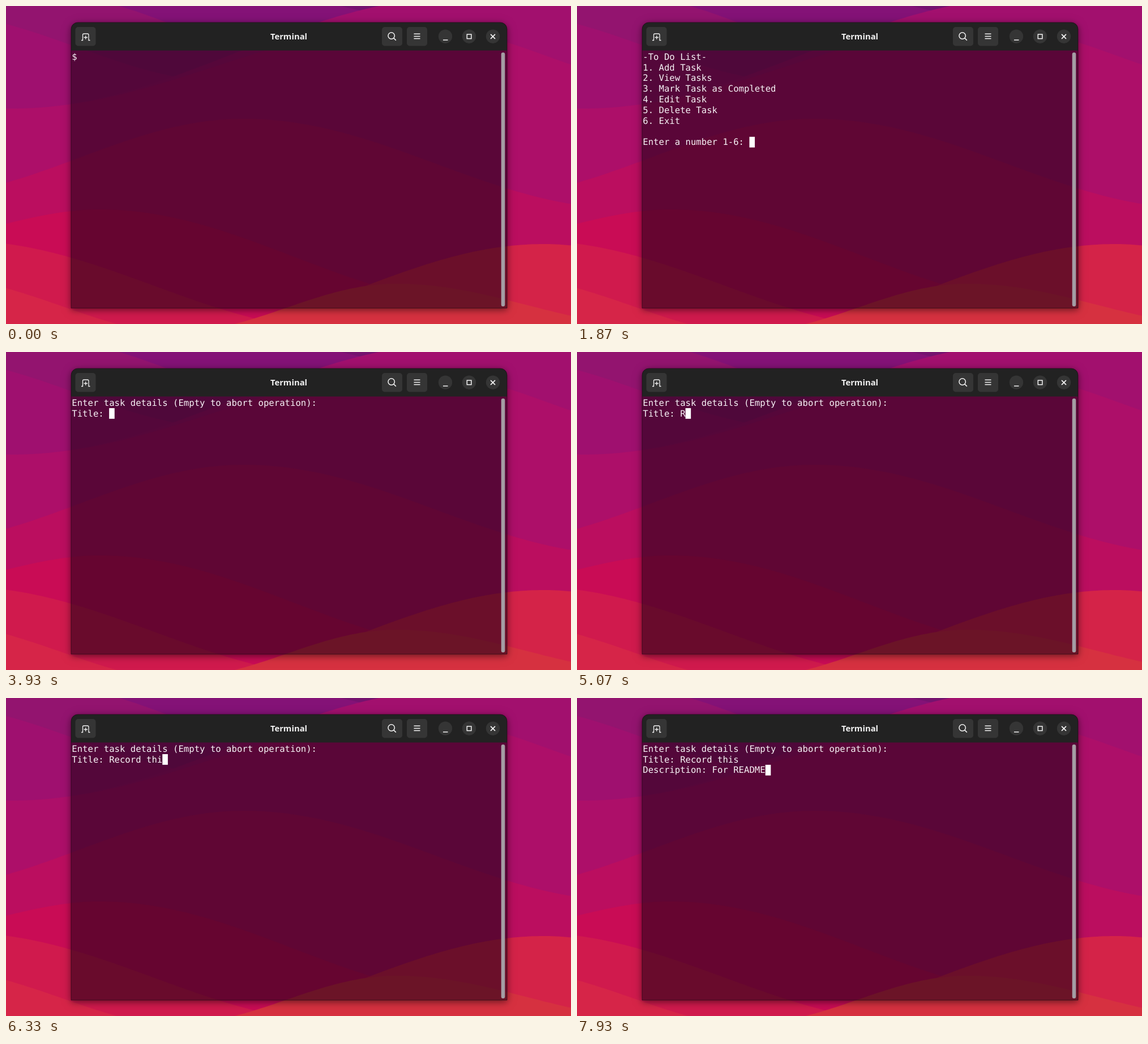
An HTML page for the animation above (8 s loop, 998x561 px).

```html
<!DOCTYPE html>
<html lang="en">
<head>
<meta charset="utf-8">
<title>Terminal to-do list</title>
<style>
  html, body { margin: 0; width: 100%; height: 100%; overflow: hidden; background: #ad0f69; }
  svg { display: block; width: 100vw; height: 100vh; }
  .shadow { filter: drop-shadow(0 3px 6px rgba(0, 0, 0, .42)) drop-shadow(0 2px 9px rgba(0, 0, 0, .14)); }
  .button { fill: #353535; }
  .icon { fill: none; stroke: #f4f4f4; stroke-width: 1.5; }
  .title { font: bold 14.8px "Open Sans", "Noto Sans", sans-serif; fill: #f2f2f2; text-anchor: middle; }
  #lines { font: 15.63px "DejaVu Sans Mono", monospace; fill: #f7f3f6; white-space: pre; text-rendering: geometricPrecision; }
</style>
</head>
<body>
<svg viewBox="0 0 998 561" preserveAspectRatio="none">
  <defs>
    <path id="frame" d="M115 533V41a12 12 0 0 1 12-12H873a12 12 0 0 1 12 12V533Z"/>
    <mask id="outside">
      <rect width="998" height="561" fill="#fff"/>
      <use href="#frame"/>
    </mask>
    <clipPath id="inside"><use href="#frame"/></clipPath>
  </defs>
  <rect width="998" height="561" fill="#75136f"/>
  <g id="waves"></g>

  <!-- The shadow is cut out of the translucent window body -->
  <g mask="url(#outside)"><use class="shadow" href="#frame"/></g>
  <g clip-path="url(#inside)">
    <rect x="115" y="78" width="770" height="456" fill="#200016" fill-opacity=".58"/>
    <rect x="115" y="29" width="770" height="49.5" fill="#222"/>
  </g>
  <use href="#frame" fill="none" stroke="#1c0713" stroke-opacity=".6"/>

  <g id="buttons" class="button"></g>
  <g class="icon">
    <path d="M133 60.5h2.5V51q0-2 2-2h6.500q2 0 2 2v9.500h2.5M137.500 55.500h6.500M140.700 52.300v6.500" stroke-width="1.3"/>
    <circle cx="680.7" cy="52.5" r="5.7"/>
    <path d="M684.8 56.600l4 4M720.5 49.200h11M720.5 53.400h11M720.5 57.600h11M772 60h8.500"/>
    <rect x="814.3" y="50" width="7.6" height="7.6"/>
    <path d="M856 49.800l8 8M864 49.800l-8 8" stroke-width="1.7"/>
  </g>
  <text class="title" x="499.5" y="59">Terminal</text>
  <rect x="874.7" y="82" width="6.6" height="448" rx="3.3" fill="#a49da4"/>

  <g id="lines"></g>
  <rect id="cursor" width="9.6" height="18.8" fill="#fff"/>
</svg>
<script>
const WIDTH = 998, HEIGHT = 561, LOOP = 8000, BLINK = 600;
const LEFT = 116.3, TOP = 80.2, CELL = 9.41, ROW = 18.82, ASCENT = 14.5;
const $ = id => document.getElementById(id);

function svg(parent, tag, attrs) {
  const node = document.createElementNS('http://www.w3.org/2000/svg', tag);
  for (const key in attrs) node.setAttribute(key, attrs[key]);
  return parent.appendChild(node);
}

// Height at x of a line that swings from crest to trough in half cosines
function swing(x, turns) {
  if (x <= turns[0][0]) return turns[0][1];
  const next = turns.findIndex(turn => turn[0] > x);
  if (next < 0) return turns.at(-1)[1];
  const [[x0, y0], [x1, y1]] = turns.slice(next - 1, next + 1);
  return y0 + (y1 - y0) * (1 - Math.cos(Math.PI * (x - x0) / (x1 - x0))) / 2;
}

// Each hill fills everything below its line and covers the hills before it
function hill(fill, ...turns) {
  let d = `M0 ${HEIGHT}`;
  for (let x = 0; x <= WIDTH + 6; x += 6) d += `L${x} ${swing(x, turns).toFixed(2)}`;
  svg($('waves'), 'path', { d: `${d}V${HEIGHT}Z`, fill });
}

hill('#841277', [520, -10], [680, 14]);
hill('#93146f', [100, -15], [460, 70]);
hill('#9f106f', [-150, 10], [400, 135]);
hill('#a2106e', [10, 181], [800, -15]);
hill('#ad0f69', [10, 181], [720, 35], [1200, 145]);
hill('#bb0e5f', [-160, 336], [420, 199], [1100, 358]);
hill('#c90c55', [-160, 408], [165, 359], [850, 525]);
hill('#d01a4d', [-80, 414], [600, 572]);
hill('#d62548', [-150, 475], [350, 585]);
hill('#d42348', [300, 575], [950, 420], [1100, 430]);
hill('#d63140', [300, 575], [690, 490], [1150, 565]);

for (const x of [122.5, 664, 708])
  svg($('buttons'), 'rect', { x, y: 37, width: 36, height: 33.5, rx: 5 });
for (const cx of [776, 818, 860])
  svg($('buttons'), 'circle', { cx, cy: 53.7, r: 12.2 });

const DETAILS = 'Enter task details (Empty to abort operation):\nTitle: ';
const MENU = `-To Do List-
1. Add Task
2. View Tasks
3. Mark Task as Completed
4. Edit Task
5. Delete Task
6. Exit

Enter a number 1-6: `;

// A burst of typing: first key press and steady time between keys
const type = (text, from, step) => [...text].map((char, i) => ({ char, time: from + i * step }));

// The first screen starts early so that its cursor is in the dark phase at first
const screens = [
  { start: -1130, text: '$ ', keys: [...type('./', 400, 200), ...type('todo', 1130, 133)] },
  { start: 1730, text: MENU, keys: type('1', 3070, 0) },
  { start: 3400, text: DETAILS, keys: type('Record this', 5000, 145) },
  { start: 6600, text: DETAILS + 'Record this\nDescription: ', keys: type('For README', 6870, 117) },
];

const rows = MENU.split('\n').map((_, i) =>
  svg($('lines'), 'text', { x: LEFT, y: TOP + ASCENT + i * ROW }));

function draw(time) {
  const screen = screens.findLast(s => s.start <= time);
  const pressed = screen.keys.filter(key => key.time <= time);
  const lines = (screen.text + pressed.map(key => key.char).join('')).split('\n');
  rows.forEach((row, i) => {
    const text = lines[i] || '';
    if (row.textContent !== text) row.textContent = text;
  });

  // Every key press restarts the blinking
  const lastInput = pressed.length ? pressed.at(-1).time : screen.start;
  const cursor = $('cursor'), last = lines.length - 1;
  cursor.setAttribute('x', LEFT + lines[last].length * CELL);
  cursor.setAttribute('y', TOP + last * ROW);
  cursor.setAttribute('opacity', Math.floor((time - lastInput) / BLINK) % 2 ? 0 : 1);
}

const begin = performance.now();
function tick() {
  draw((performance.now() - begin) % LOOP);
  requestAnimationFrame(tick);
}
tick();
</script>
</body>
</html>
```
